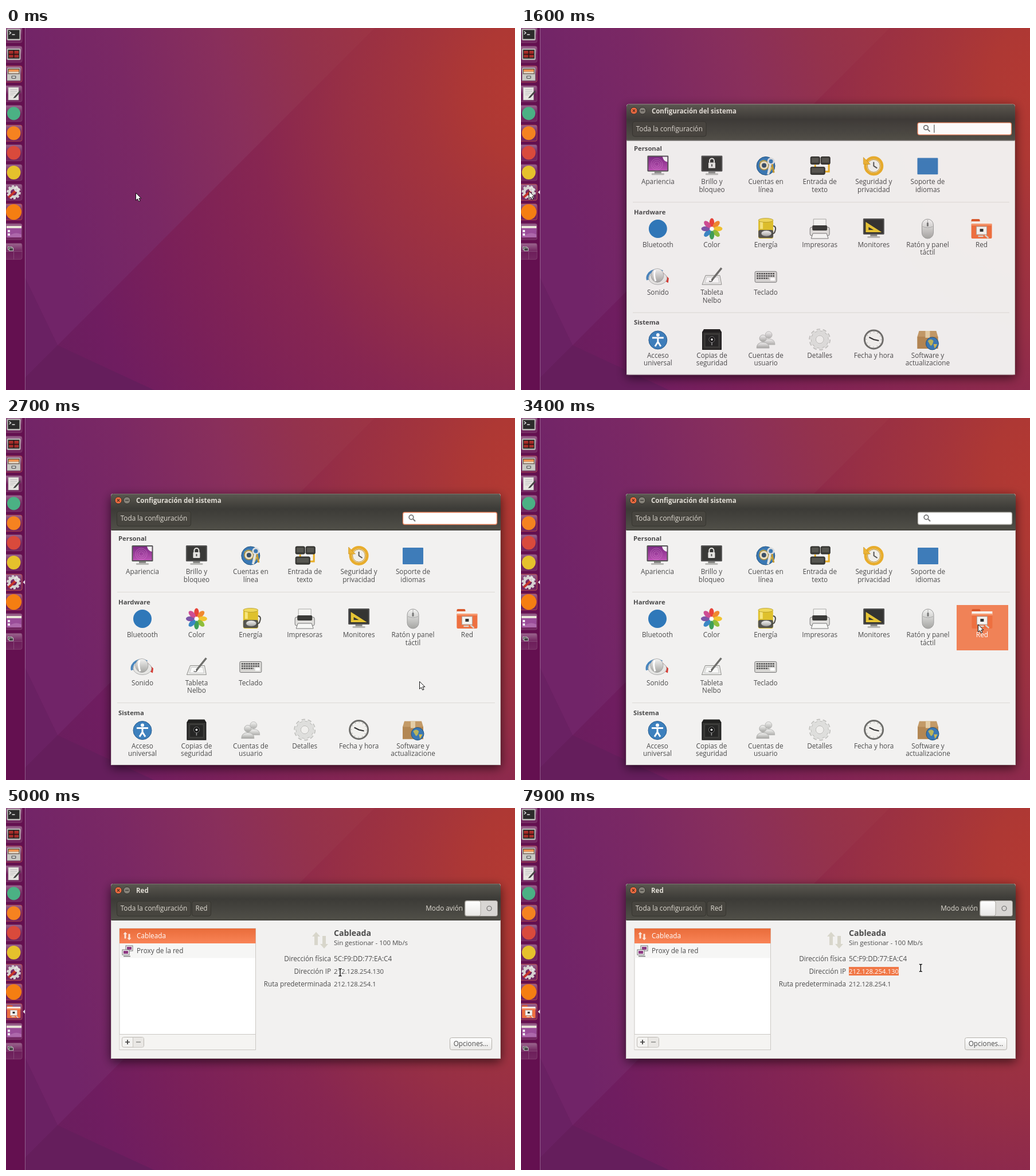
An HTML page for the animation above (8 s loop, 888 by 631 pixels).

```html
<!DOCTYPE html>
<html lang="es">
<head>
<meta charset="utf-8">
<title>Configuración de red</title>
<style>
html, body { margin: 0; width: 100%; height: 100%; overflow: hidden; background: #6a1f5e; }
svg { display: block; position: absolute; left: 0; top: 0; }
</style>
</head>
<body>
<svg id="stage" width="888" height="631" viewBox="0 0 888 631" fill="#4c4c4c"
  font-family="'Open Sans','Noto Sans',sans-serif" font-size="11.75"></svg>
<script>
// Markup helpers
const R = (x, y, w, h, f, o = '') => `<rect x="${x}" y="${y}" width="${w}" height="${h}" fill="${f}" ${o}/>`;
const C = (x, y, r, f, o = '') => `<circle cx="${x}" cy="${y}" r="${r}" fill="${f}" ${o}/>`;
const E = (x, y, a, b, f, o = '') => `<ellipse cx="${x}" cy="${y}" rx="${a}" ry="${b}" fill="${f}" ${o}/>`;
const P = (d, f = 'none', o = '') => `<path d="${d}" fill="${f}" ${o}/>`;
const T = (x, y, s, o = '') => `<text x="${x}" y="${y}" ${o}>${s}</text>`;
const G = (s, o = '') => `<g ${o}>${s}</g>`;
const at = (x, y, s, o = '') => G(s, `transform="translate(${x} ${y})" ${o}`);
const S = (c, w = 1) => `stroke="${c}" stroke-width="${w}"`;
const round = r => `rx="${r}" `;
const bold = 'font-weight="700" ', mid = 'text-anchor="middle" ';

const stops = list => list.map(([o, c, a = 1]) => `<stop offset="${o}" stop-color="${c}" stop-opacity="${a}"/>`).join('');
const vert = (id, ...list) => `<linearGradient id="${id}" x2="0" y2="1">${stops(list)}</linearGradient>`;

const defs = `<defs>
<radialGradient id="warm" gradientUnits="userSpaceOnUse" cx="0" cy="0" r="1"
  gradientTransform="translate(910 110) scale(950 1200)">${stops([[0, '#b43932'], [.1, '#ae3834'], [.2, '#a3343c'],
    [.34, '#972f45'], [.5, '#872651'], [.7, '#7a2059'], [.85, '#6f1d60'], [1, '#681e5d']])}</radialGradient>
<linearGradient id="fold" gradientUnits="userSpaceOnUse" x1="33" y1="120" x2="635" y2="-20">${stops([[0, '#712468'],
    [.28, '#7a2864'], [.57, '#892f5b'], [.8, '#94324c'], [1, '#9d3444']])}</linearGradient>
${vert('bar', [0, '#5b5851'], [.1, '#53514a'], [.42, '#3c3b37'], [1, '#504f48'])}
${vert('tile', [0, '#fff', .36], [.4, '#fff', .14], [.55, '#fff', .06], [1, '#fff', .1])}
${vert('steel', [0, '#f4f4f3'], [1, '#a5a5a2'])}
${vert('orange', [0, '#e96c3a'], [1, '#f98457'])}
${vert('knob', [0, '#ffffff'], [1, '#e9e8e6'])}
${vert('violet', [0, '#7d2a83'], [1, '#bb52b4'])}
<filter id="shade" x="-10%" y="-15%" width="120%" height="130%"><feDropShadow dx="0" dy="5" stdDeviation="9" flood-opacity=".62"/></filter>
<clipPath id="cut"><rect id="cutBox" x="572" y="276" width="0" height="17"/></clipPath>
</defs>`;

const wallpaper = R(0, 0, 888, 631, 'url(#warm)')
  + P('M33 0H643L90 553L33 435Z', 'url(#fold)')
  + P('M33 435L90 553L33 610Z', '#6a2163')
  + P('M90 553L33 610V631H258Z', '#651e5c');

// Icons, drawn around their own centre
const screen = inner => R(-6, 10, 12, 4, '#8b8b88') + R(-11, 13, 22, 3, '#b9b9b6', round(1))
  + R(-18.5, -18, 37, 28, '#555', round(1.5)) + inner;
const gear = (r, f) => C(0, 0, r, 'none', S(f, r * .36) + ' pathLength="20" stroke-dasharray="1.15 .85"')
  + C(0, 0, r * .75, 'none', S(f, r * .45));
const globe = (x, y, r) => C(x, y, r, '#3a78b4', S('#24557f'))
  + P(`M${x - r * .7} ${y - r * .4}q${r * .5} ${-r * .5} ${r * .9} 0q${-r * .2} ${r * .9} ${-r * .5} ${r * .7}z`, '#b9b45c')
  + P(`M${x + r * .2} ${y + r * .1}l${r * .6} 0l${-r * .4} ${r * .7}z`, '#d5b94d');
const folder = R(-18, -17, 15, 8, '#d9592c', round(2)) + R(-18, -13, 36, 7, '#f6f2ee')
  + R(-18, -9, 36, 26, '#ee7040', round(2)) + R(-18, -9, 36, 3, '#f79a70')
  + R(-9, -4, 18, 14, '#f5f3f0', S('#aaa69f')) + R(-3, 0, 6, 5, '#333') + P('M-6 13H3M6 11L12 16', 'none', S('#d8d4ce', 2.5));
const person = (x, y, k) => at(x, y, C(0, -7, 6, 'url(#steel)', S('#b0b0ae')) + P('M-11 10Q-11 0 0 0T11 10Z', 'url(#steel)', S('#b0b0ae')), `opacity="${k}"`);
const key = (x, y, w) => R(x, y, w, 13, '#3d3d39', round(2) + S('#22221f')) + R(x + 2, y + 2, w - 4, 8, '#565650', round(1));
const petals = ['#e8443a', '#f0892f', '#f2c531', '#8fbe3b', '#3f9f58', '#3a87c4', '#7d56a8', '#cf4d93'];

const icons = {
  look: screen(R(-16.5, -16, 33, 24, 'url(#violet)') + [4, 7, 10].map(r => C(-2, -3, r, 'none', S('#d98bd0', .5))).join('')
    + P('M8 -16H16.5V-7Q10 -8 8 -16Z', '#f3f1f3')),
  lock: screen(R(-16.5, -16, 33, 24, '#393937') + R(-6, -6, 12, 10, '#e5e4e1', round(1))
    + P('M-4 -6V-9A4 4 0 0 1 4 -9V-6', 'none', S('#e5e4e1', 2)) + R(-1, -3, 2, 4, '#555')),
  keys: globe(0, 0, 16) + C(-3, -1, 8, '#e9dfc3', S('#a58b41', 1.5)) + C(-3, -1, 4, '#3a5068')
    + C(9, -8, 5, 'none', S('#d9dcde', 3)) + P('M8 -3L4 15', 'none', S('#e2e3e2', 4)) + P('M11 -3L14 12', 'none', S('#c49a35', 3)),
  input: P('M-8 -2V3M2 -9H16V10H-2', 'none', S('#e8ae26', 3)) + key(-16, -16, 16) + key(2, -16, 16) + key(-16, 2, 25),
  secure: C(0, 0, 14.5, '#eeece4', S('#e8ad2d', 5)) + C(0, 0, 11, '#efeeea', S('#c28e22')) + P('M-18 -15V-3H-6Z', '#edb435', S('#c28e22', .6))
    + P('M0 -7V0L6 4', 'none', S('#555', 2)),
  flag: R(-18, -14, 36, 29, '#3e7cb9', round(1)),
  wave: C(0, 0, 16, '#2f78b9'),
  color: petals.map((c, i) => E(0, -11, 4.2, 7.5, c, `transform="rotate(${i * 45})"`)).join('') + C(0, 0, 3, '#fff'),
  power: R(-13, -15, 26, 32, '#dfc12c', round(3)) + R(-13, 2, 26, 14, '#55554f', round(3)) + R(-10, -13, 5, 13, '#f7e57c')
    + E(0, -15, 13, 3.5, '#f0d95a', S('#a98f20', .7)) + P('M13 -5Q20 -4 15 7L5 13', 'none', S('#494944', 2)) + E(1, 8, 9, 5, 'url(#steel)', S('#777', .7)),
  print: P('M-11 -17H11V0H-11Z', '#f5f5f3', S('#a9a9a6')) + R(-17, -3, 34, 15, '#e0dfdc', round(3) + S('#777'))
    + R(-13, -6, 26, 9, '#3b3b39', round(2)) + P('M-12 8H12L15 17H-15Z', '#f7f7f5', S('#777')),
  display: screen(R(-16.5, -16, 33, 24, '#343432') + P('M-14 -12V6H14Z', '#e6c435') + P('M-9 -3V2H0Z', '#343432')),
  mouse: R(-10, -17, 20, 34, 'url(#steel)', round(10) + S('#999')) + P('M-9 -4Q0 0 9 -4M0 -16V-11', 'none', S('#aaa'))
    + R(-1.5, -11, 3, 7, '#777', round(1.5)),
  net: folder,
  sound: P('M-18 6A17 14 0 0 1 8 -9', 'none', S('#4a86bd', 4)) + P('M9 -7L19 3L18 11L7 5Z', '#d63a31')
    + E(0, 3, 16, 11, '#e6e6e4', S('#aaa')) + E(-1, -2, 11, 12, 'url(#steel)', S('#999', .7)) + P('M-5 -11Q-8 -3 -4 8', 'none', S('#fff', 3)),
  tablet: P('M-11 -2H14L17 14H-17Z', '#e9e9e7', S('#8f8f8c')) + P('M-9 1H11L13 11H-12Z', '#f8f8f7', S('#bbb', .7))
    + P('M17 -15L0 6', 'none', S('#6f6f6c', 3.5)) + P('M-5 8Q2 10 0 5', 'none', S('#444', 1.3)),
  board: R(-19, -9, 38, 19, '#d8d7d4', round(2) + S('#777')) + [-5, -1, 3].map(y => P(`M-16 ${y}H${y < 3 ? 16 : 5}`, 'none', S('#555', 2.6) + ' stroke-dasharray="3 1"')).join('')
    + R(8, 2, 8, 5, '#fff'),
  access: C(0, 1, 16, '#3d80bd', S('#2b5f90')) + C(0, -8, 3, '#fff') + P('M-10 -3H10M0 -3V4L-5 12M0 4L5 12', 'none', S('#fff', 3)),
  safe: P('M-14 -18H14L17 -13V18H-17V-13Z', '#222221') + R(-16, -13, 32, 30, '#343432', S('#151515')) + R(-12, -9, 24, 22, '#262625', S('#464644'))
    + C(0, 0, 5, '#111', S('#777')) + C(0, 0, 2, '#ddd') + P('M0 5V10', 'none', S('#999', 1.5)),
  users: person(5, -1, .85) + person(-5, 5, 1),
  detail: gear(16, '#b9b9b6') + gear(15, '#dededc') + C(0, 0, 7, '#f0efed', S('#b5b5b2')),
  clock: C(0, 0, 16, '#f1f0ed', S('#6e6e6b', 3)) + C(0, 0, 13, 'none', S('#999', 1.5) + ' pathLength="12" stroke-dasharray=".15 .85"')
    + P('M-8 -4L0 0L9 2', 'none', S('#333', 2)),
  box: P('M-15 -15H15L18 -5V16H-18V-5Z', '#c39a67') + R(-18, -5, 36, 21, '#b38753') + R(-4, -15, 8, 12, '#e4cda6') + globe(8, 7, 11)
};

// Windows
const windowBase = (h, title) => R(183, 132, 680, h, '#f2f1f0', round(4) + 'filter="url(#shade)"') + R(183, 190, 680, h - 58, '#f2f1f0')
  + P('M183 195V137Q183 132 188 132H858Q863 132 863 137V195Z', 'url(#bar)') + P('M188 132.5H858', 'none', S('#77746b'))
  + P('M183 195.5H863', 'none', S('#33322e')) + P(`M183.5 195V${131.5 + h}H862.5V195`, 'none', S('#b5b2ac', .6))
  + C(196, 143.5, 6, '#ef6c41', S('#33312c')) + P('M193.8 141.3l4.4 4.4m0 -4.4l-4.4 4.4', 'none', S('#55301f', 1.3))
  + C(211, 143.5, 6, '#86837a', S('#33312c')) + P('M208 143.5h6', 'none', S('#3c3b37', 1.4))
  + T(227, 148, title, bold + 'fill="#e2ded6" font-size="11.5"') + crumb(193, 130, 'Toda la configuración');
function crumb(x, w, s) {
  return R(x + .5, 162.5, w - 1, 26, '#47453f', round(4) + S('#36352f')) + T(x + w / 2, 179, s, mid + 'fill="#dfdbd2"');
}

const sections = [[213, 'Personal'], [324, 'Hardware'], [517, 'Sistema']];
const rows = [
  [240, 'look:Apariencia|lock:Brillo y/bloqueo|keys:Cuentas en/línea|input:Entrada de/texto|secure:Seguridad y/privacidad|flag:Soporte de/idiomas'],
  [350, 'wave:Bluetooth|color:Color|power:Energía|print:Impresoras|display:Monitores|mouse:Ratón y panel/táctil|net:Red'],
  [433.5, 'sound:Sonido|tablet:Tableta/Nelbo|board:Teclado'],
  [543.5, 'access:Acceso/universal|safe:Copias de/seguridad|users:Cuentas de/usuario|detail:Detalles|clock:Fecha y hora|box:Software y/actualizacione']
];
const cell = (entry, col, y) => {
  const [name, label] = entry.split(':');
  const lines = label.split('/').map((s, i) => T(0, 32 + i * 13.5, s, mid)).join('');
  return at(238 + col * 94.4, y, icons[name] + G(lines, `id="label-${name}"`));
};
const settings = windowBase(473, 'Configuración del sistema')
  + R(692.5, 164.5, 164, 21, '#fff', round(3) + 'id="search" stroke-width="1.3"')
  + C(707, 173, 3.8, 'none', S('#777', 1.8)) + P('M710 176l4 4', 'none', S('#777', 2))
  + R(721, 168, 1, 14, '#333', 'id="caret"')
  + P('M194 303.5H853M194 496.5H853', 'none', S('#dddad6'))
  + R(760, 326, 90, 79, '#f08257', 'id="pick"')
  + sections.map(([y, s]) => T(196, y + .5, s, bold + 'font-size="11.3"')).join('')
  + rows.map(([y, line]) => line.split('|').map((e, i) => cell(e, i, y)).join('')).join('');

const arrows = (f, k) => P('M-7 -14L0 -6H-4V9H-10V-6H-14Z', f, `transform="scale(${k})"`)
  + P('M7 15L14 7H10V-7H4V7H0Z', f, `transform="scale(${k})"`);
const miniScreen = (x, y) => R(x, y, 12, 9, '#f0edf0', S('#777')) + R(x + 2, y + 2, 8, 5, '#8d3a82');
const ip = '212.128.254.130';
const facts = [[267, 'Dirección física', '5C:F9:DD:77:EA:C4', 11.75], [289, 'Dirección IP', ip, 11.35], [310.5, 'Ruta predeterminada', '212.128.254.1', 11.3]];
const network = windowBase(305, 'Red') + crumb(324, 34, 'Red')
  + T(797, 179, 'Modo avión', 'text-anchor="end" fill="#dfdbd2"')
  + R(800.5, 161.5, 57, 27, '#d8d6d3', round(3) + S('#94918b')) + R(801, 162, 27, 26, 'url(#knob)', round(3) + S('#aaa7a1'))
  + C(843, 175, 4, 'none', S('#666', 1.1))
  + R(198, 210, 237.5, 211.5, '#fff', S('#cbc8c4')) + R(198, 210, 237.5, 26, 'url(#orange)') + R(198.5, 236, 236.5, 25.5, '#f6f6f5')
  + at(211.5, 223, arrows('#fbe5da', .5)) + T(228, 227, 'Cableada', 'fill="#fff"')
  + miniScreen(209, 240) + miniScreen(203, 247) + P('M205 258.5h12', 'none', S('#777', 1.5)) + T(228, 252.5, 'Proxy de la red')
  + R(198.5, 394.5, 236.5, 26.5, '#f5f4f2') + P('M198 394.5H435', 'none', S('#cbc8c4'))
  + R(202.5, 399.5, 38, 17.5, '#f4f3f1', round(3) + S('#bbb8b3')) + R(222, 400, 18, 16.5, '#e9e7e4', round(2)) + P('M221.5 400V417', 'none', S('#c7c4bf'))
  + P('M208 408h8m-4 -4v8', 'none', S('#3c3c3c', 1.7)) + P('M227 408h8', 'none', S('#8b8b88', 1.5))
  + at(548, 230, arrows('#d8d6cb', 1)) + T(572, 223, 'Cableada', bold + 'font-size="14.1"')
  + T(572, 239, 'Sin gestionar - 100 Mb/s', 'font-size="11.5"')
  + facts.map(([y, k, v, size]) => T(567, y, k, 'text-anchor="end"') + T(572, y, v, `font-size="${size}"`)).join('')
  + G(R(572, 277, 87, 15, '#f07746') + T(572, 289, ip, 'font-size="11.35" fill="#fff"'), 'clip-path="url(#cut)"')
  + R(774.5, 400.5, 73, 21, 'url(#knob)', round(3) + S('#b3b0aa')) + T(811, 415, 'Opciones…', mid);

// Launcher
const pitch = 34.35, slotY = i => 11.5 + pitch * i;
const frame = inner => R(-12, -10, 24, 20, '#bdbbb9', round(2)) + R(-10, -8, 20, 15.5, '#2c2b2b') + inner;
const dot = (f, r = 11.5) => C(0, 0, r, f);
const apps = [
  frame(P('M-8 -5.5l3 2.5l-3 2.5M-3 0h5', 'none', S('#eee', 1.3))),
  frame(R(-8.5, -6, 17, 11.5, '#b3302c') + P('M0 -7V6M-9 0H9', 'none', S('#2c1616', 2)) + P('M-7 -3H7M-7 3H7', 'none', S('#6d1a1a', 1.5) + ' stroke-dasharray="1 2"')),
  R(-11.5, -11, 23, 22, '#bab7b3', round(2)) + R(-10, -9, 20, 9, '#4b3a34') + R(-9, -8, 18, 4, '#ef9450') + R(-9, -4, 18, 3, '#e9d9c4')
    + R(-11.5, 0, 23, 11.5, '#c9c7c3', S('#8f8c88', .6)) + R(-4, 3, 8, 5, '#666', round(1)) + R(-2.5, 4.5, 5, 2, '#eee'),
  R(-9.5, -11, 18, 22, '#e6e4e0', S('#aaa', .6)) + P('M-6 -7H6M-6 -4H6M-6 -1H3M-6 2H0', 'none', S('#bbb')) + P('M11 -6L1 5L-1 8L3 7L12 -3Z', '#444'),
  dot('#4bb184'), dot('#f58220', 12), dot('#d94a3c', 12), dot('#e5c12c', 12),
  gear(10.5, '#d5d3d1') + P('M-9 9L3 -2', 'none', S('#c5352c', 4)) + C(5, -5, 3.2, 'none', S('#e8e6e4', 2)),
  dot('#f57e12', 13.5),
  R(-12.5, -10, 26, 20, '#9a4d99') + R(-12.5, -10, 26, 4, '#e9e6d8') + P('M-12 10Q2 -2 13.5 5V10Z', '#ad68ab') + R(-10.5, -3, 4, 4, '#eee') + R(-10.5, 3, 4, 4, '#eee'),
  P('M0 -14V14M-14 0H15', 'none', S('#8d5581', .8)) + R(-10, -8, 7, 5, '#444', S('#ccc', .8)) + R(-8, -6, 7, 5, '#444', S('#ccc', .8))
];
const lit = new Set([2, 5, 9]);
const tile = (inner, warm) => R(-16, -14, 30.5, 28, 'url(#tile)', round(3) + S(warm ? '#b84c4c' : '#80406f', .9)) + inner;
const slot = (s, i) => at(13.5, slotY(i), tile(s, lit.has(i)));
const launcher = R(0, 0, 33, 631, '#641050') + R(33, 0, 1, 631, '#fff', 'opacity=".27"')
  + apps.slice(0, 10).map(slot).join('')
  + R(-2.5, slotY(8) - 14, 30.5, 28, 'none', round(3) + S('#b84c4c') + ' id="glow"')
  + at(13.5, slotY(10), tile(G(folder, 'transform="scale(.66)"'), true), 'id="newApp"')
  + G(apps.slice(10).map((s, i) => slot(s, i + 10)).join(''), 'id="lower"')
  + P('M33 -3.5V3.5L29.5 0Z', '#e6dde3', 'id="mark"');

const beam = 'M-2.5 -6.2H-1Q0 -6 0 -5V5Q0 6 -1 6.2H-2.5M2.5 -6.2H1Q0 -6 0 -5M0 5Q0 6 1 6.2H2.5';
const pointer = G(P('M.5 .5V13.5L3.5 10.8L5.7 15.3L8 14.4L5.9 9.9H9.9Z', '#fff', S('#111')), 'id="arrow"')
  + G(P(beam, 'none', S('#fff', 3.2)) + P(beam, 'none', S('#111', 1.5)), 'id="beam"');

document.getElementById('stage').innerHTML = defs + wallpaper + launcher
  + G(settings, 'id="settings"') + G(network, 'id="network"') + pointer;

// Motion: start, end, from, bend, to
const moves = [
  [0, 1000, [226, 287], [120, 287], [13.5, 284]],
  [1600, 2000, [13.5, 284], [46, 283], [79, 281]],
  [2000, 2900, [79, 281], [500, 888], [762, 389]],
  [2900, 3300, [762, 389], [780, 370], [797, 359.5]],
  [4100, 5000, [797, 359.5], [690, 315], [583, 286.5]],
  [5000, 5200, [583, 286.5], [580, 286], [578, 285]],
  [5300, 5600, [578, 285], [576, 284.5], [573.5, 284.5]],
  [5700, 6600, [573.5, 284.5], [620, 286], [668.5, 284.5]],
  [7000, 7200, [668.5, 284.5], [685, 284.5], [700.5, 284.5]],
  [7800, 7900, [700.5, 284.5], [699, 281], [697.3, 278.8]]
];
const clamp = v => Math.max(0, Math.min(1, v));
const ease = k => k * k * k * (k * (k * 6 - 15) + 10);
function pointerAt(t) {
  const [start, end, a, b, c] = moves.filter(m => t >= m[0]).pop();
  const k = ease(clamp((t - start) / (end - start))), n = 1 - k;
  return a.map((v, i) => n * n * v + 2 * n * k * b[i] + k * k * c[i]);
}

const ui = id => document.getElementById(id);
const set = (id, name, value) => ui(id).setAttribute(name, value);
const show = (id, on) => set(id, 'visibility', on ? 'visible' : 'hidden');
const move = (id, x, y) => set(id, 'transform', `translate(${x} ${y})`);

function draw(t) {
  const [x, y] = pointerAt(t);
  const text = t >= 5000 || (t > 4100 && x < 662);
  move('arrow', x, y);
  move('beam', x, y);
  show('arrow', !text);
  show('beam', text);

  const opening = t < 1700, picked = t >= 3400;
  set('settings', 'display', t >= 1600 && t < 3600 ? 'inline' : 'none');
  set('settings', 'opacity', opening ? .975 : 1);
  set('settings', 'transform', opening ? 'translate(523 368.5) scale(.997) translate(-523 -368.5)' : '');
  set('network', 'display', t >= 3600 ? 'inline' : 'none');
  set('pick', 'display', picked ? 'inline' : 'none');
  set('label-net', 'fill', picked ? '#fff' : '#4c4c4c');
  set('search', 'stroke', picked ? '#b9b6b0' : '#ee8660');
  set('caret', 'opacity', !picked && (t < 2200 || t >= 2800) ? 1 : 0);

  const slide = clamp((t - 3500) / 300);
  move('lower', 0, pitch * slide);
  set('newApp', 'opacity', slide);
  set('glow', 'opacity', clamp((t - 1100) / 400));
  move('mark', 0, slotY(t >= 3700 ? 10 : 8));
  show('mark', t >= 1600);

  const step = 87 / ip.length;
  const chars = t < 5700 ? 0 : Math.max(0, Math.min(ip.length, Math.round((x - 572) / step)));
  set('cutBox', 'width', chars * step);
}

function tick(now) {
  draw(Math.floor(now % 8000 / 100) * 100);
  requestAnimationFrame(tick);
}
tick(performance.now());
</script>
</body>
</html>
```
